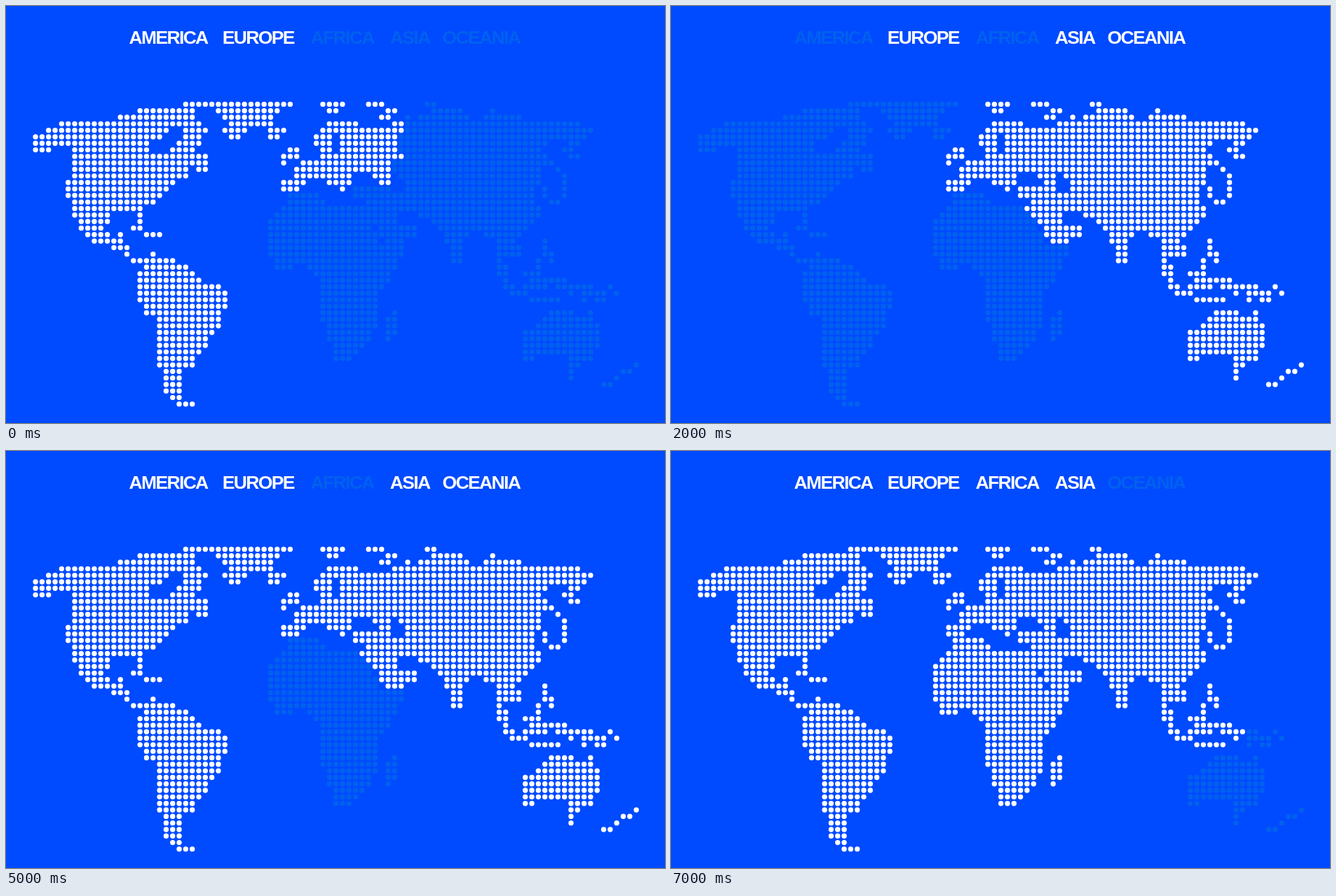
An HTML page with a canvas that plays this animation: 940 px wide and 596 px high, repeating every 8 s.

```html
<!DOCTYPE html>
<html lang="en">
<head>
<meta charset="utf-8">
<title>Continents</title>
<style>
  html, body { margin: 0; width: 100%; height: 100%; overflow: hidden; background: #004aff; }
  canvas { display: block; }
</style>
</head>
<body>
<canvas id="stage" width="940" height="596"></canvas>
<script>
const ctx = document.getElementById('stage').getContext('2d');
const COLORS = { back: '#004aff', on: '#ffffff', off: '#0061ee' };
const GRID = { x: 42.1, y: 140.4, step: 9.315, cols: 93, rows: 47, radius: 3.7 };

// Outlines run through the outermost dots of the grid; coasts are open lines.
const continents = [
  {
    name: 'AMERICA', x: 175.5,
    lands: [
      `M16 1H24V2L26 4 25 5V6L24 7 26 8V10H25L24 9 23 10V11L21 12 18 15 16 16H12L11 17V18
       L10 19 11 20 13 21 14 22V23L12 22 9 21 7 19V18L6 17V15L5 14V12L6 11V6H2V7H0V5L2 4 4 3 14 2Z
       M20 4L21 3H22L23 4V5L21 7V8H17V6L19 5Z`,
      'M28 1H37L36 2V3L38 4 37 5H36V4L35 3 32 4 31 5H30L29 4 30 3 29 2Z',
      `M15 24H21L23 25 25 27 28 28 29 29V31L28 32V34L26 36V37L24 39V40H22V46L20 44V41L19 40V33
       L17 32V31L16 30V26L17 25V24Z`
    ],
    coasts: 'M23 0H39M16 16V19H15M13 20V21M17 20H19M18 23V24M22 46H24'
  },
  {
    name: 'EUROPE', x: 308.8,
    lands: [
      `M45 3H49L51 4H55V3H56V4L55 5V7L56 8 54 9V12H53L52 11V10H49L48 11V12H45L43 11H40V10
       L41 9 44 8V7L43 6V5L44 4Z M46 4L47 5V7L46 8 45 7V5Z`
    ],
    coasts: `M44 0H47M45 1H46M51 0H53L54 1H55L54 2H53M39 7H40V8H38V9M40 8L41 9
      M38 12H41M38 13H40M47 12V13`
  },
  {
    name: 'AFRICA', x: 434.5,
    lands: [
      `M39 14H43L45 16H49L51 18V19L52 20V21L55 22H56V23L55 24V25L54 26V27L52 29V34L51 35V36
       L48 39H46V37L45 36V34L44 33V27L42 25 41 24H40L39 25H37V24L36 23V18L39 15Z`,
      'M55 32V35L54 36V33Z'
    ],
    coasts: ''
  },
  {
    name: 'ASIA', x: 547.7,
    lands: [
      `M61 1H65L67 3 69 2H74L75 3H83L85 4 84 5H79L77 7 79 9 77 10V12L76 13V15L77 16V17L73 21
       L74 22V23H73L72 22H71V21L69 20 68 19H67L65 21V24H64V22L63 21V20L61 18 59 17 57 16V12
       L55 10V9L57 8 56 7V5L57 4V3L59 2Z`,
      'M49 13H54L55 14H57V16H55V18L56 19H58V20L56 21H54L53 20 52 18 50 16H51V15L49 14Z'
    ],
    coasts: `M60 0H61V1M70 1V2M57 2V3M84 5L83 6H82V7H81M82 7V8H83
      M79 9L81 11V14L80 15H79L78 14V13M71 22V26H72V28H73V29H75M71 23H72M72 25V26
      M75 26H77V24M75 28H77V27H81M75 28L76 27M78 27V28M80 28H83M82 28V29M76 30H80
      M78 21V23H79V24`
  },
  {
    name: 'OCEANIA', x: 622.6,
    lands: [
      `M79 32H82L83 33H84L85 32V33L86 34V37L85 38V39H82L81 38H77L76 39H75V35L77 34Z`
    ],
    coasts: `M85 28H84V30M84 29H87V30H86M88 28L89 29M82 39V42M82 40H83
      M92 40L91 41H90L88 43H87`
  }
];

// Lit continents, in the order above.
const scenes = [
  { start: 0, lit: '11000' },
  { start: 970, lit: '00110' },
  { start: 2000, lit: '01011' },
  { start: 3000, lit: '01111' },
  { start: 4000, lit: '10111' },
  { start: 5000, lit: '11011' },
  { start: 5970, lit: '11101' },
  { start: 7000, lit: '11110' }
];
const LOOP = 8000;

function buildDots() {
  ctx.lineWidth = 0.3;
  ctx.lineJoin = ctx.lineCap = 'round';
  const shapes = continents.map(c => ({
    lands: c.lands.map(d => new Path2D(d)),
    coasts: new Path2D(c.coasts)
  }));
  const covers = (shape, col, row) =>
    ctx.isPointInStroke(shape.coasts, col, row) ||
    shape.lands.some(land => ctx.isPointInPath(land, col, row, 'evenodd') ||
      ctx.isPointInStroke(land, col, row));

  continents.forEach(c => c.dots = new Path2D());
  for (let row = 0; row < GRID.rows; row++) {
    for (let col = 0; col < GRID.cols; col++) {
      const owner = shapes.findIndex(shape => covers(shape, col, row));
      if (owner < 0) continue;
      const x = GRID.x + col * GRID.step;
      const y = GRID.y + row * GRID.step;
      const dots = continents[owner].dots;
      dots.moveTo(x + GRID.radius, y);
      dots.arc(x, y, GRID.radius, 0, Math.PI * 2);
    }
  }
}

function draw() {
  const time = performance.now() % LOOP;
  const scene = scenes.findLast(s => s.start <= time);
  ctx.fillStyle = COLORS.back;
  ctx.fillRect(0, 0, 940, 596);
  ctx.font = 'bold 26.5px "Liberation Sans", Arial, sans-serif';
  ctx.letterSpacing = '-1.65px';
  continents.forEach((c, i) => {
    ctx.fillStyle = scene.lit[i] === '1' ? COLORS.on : COLORS.off;
    ctx.fillText(c.name, c.x, 54);
    ctx.fill(c.dots);
  });
  requestAnimationFrame(draw);
}

buildDots();
draw();
</script>
</body>
</html>
```
